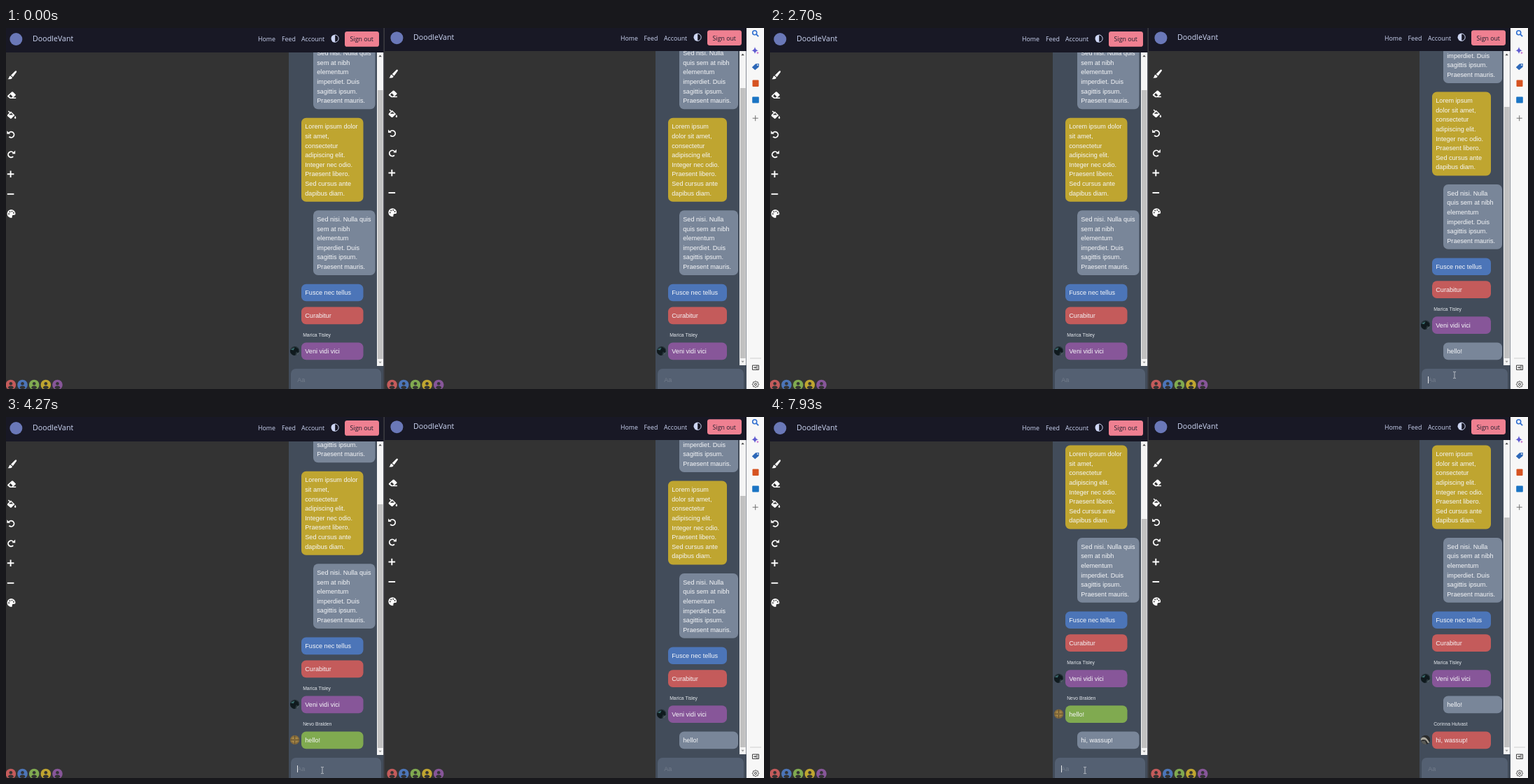
Write an HTML page with a canvas that moves like this. It is 1083 by 517 pixels and loops after 8 s.

```html
<!DOCTYPE html>
<html lang="en">
<head>
<meta charset="utf-8">
<title>Shared canvas chat</title>
<style>
  html, body { margin: 0; width: 100%; height: 100%; overflow: hidden; background: #333; }
  canvas { display: block; width: 100vw; height: 100vh; }
</style>
</head>
<body>
<canvas id="stage" width="1083" height="517"></canvas>
<script>
const ctx = document.getElementById('stage').getContext('2d');
const LOOP = 8000, BLINK = 530, LINE = 13.62;
const CHAT = '9.1px "Liberation Sans", Arial, sans-serif';
const NAME = '6.8px "Liberation Sans", Arial, sans-serif';
const NAV = '8.8px "Open Sans", sans-serif';
const BRAND = '10.7px "Open Sans", sans-serif';
const C = {
  bar: '#181825', page: '#333333', panel: '#424c5a', input: '#546072', own: '#798699',
  yellow: '#bfa530', blue: '#4c75b8', red: '#c45b5b', purple: '#875699', green: '#80aa50',
  nav: '#cdd6f4', white: '#f6f7f9'
};

function box(x, y, w, h, color, r = 0) {
  ctx.fillStyle = color;
  ctx.beginPath();
  ctx.roundRect(x, y, w, h, r);
  ctx.fill();
}
function disc(x, y, r, color) {
  ctx.fillStyle = color;
  ctx.beginPath();
  ctx.arc(x, y, r, 0, Math.PI * 2);
  ctx.fill();
}
function text(s, x, y, font, color) {
  ctx.font = font;
  ctx.fillStyle = color;
  ctx.fillText(s, x, y);
}
function fill(d, color) {
  ctx.fillStyle = color;
  ctx.fill(new Path2D(d), 'evenodd');
}
function stroke(d, color, w) {
  ctx.strokeStyle = color;
  ctx.lineWidth = w;
  ctx.stroke(new Path2D(d));
}
function at(x, y, draw) {
  ctx.save();
  ctx.translate(x, y);
  draw();
  ctx.restore();
}

// Toolbar icons, drawn around their centre
function turn() {
  ctx.strokeStyle = '#fff';
  ctx.lineWidth = 1.8;
  ctx.beginPath();
  ctx.arc(0.4, 0.2, 4.1, -2.5, 2.4);
  ctx.stroke();
  fill('M-5.6 -5.4V-.8H-1Z', '#fff');
}
const tools = [
  [9, 67.3, () => fill('M6.2 -5.2Q5.6 -6.6 4 -5.6L-2 .4L.8 3L6 -4ZM-2.8 1.2L0 3.7Q-.5 6 -3 6H-6.4Q-4.6 4.6 -4.5 3Q-4.3 1.4 -2.8 1.2Z', '#fff')],
  [8.2, 96, () => fill('M-6 1L0 -4.5Q1 -5 2 -4.3L5.5 -.8Q6 0 5.3 .8L2 3.5H6V5H-2.5L-6 2.2ZM-3.8 1.5L-1.5 3.5H0L1.3 2.2L-1.8 -1Z', '#fff')],
  [8, 124.5, () => {
    fill('M-6 0L-1 -5L4.5 .5L-.5 5.2Q-1.2 5.7 -2 5L-6 1.5ZM-3.8 0H2.2L-1 -3.2Z', '#fff');
    stroke('M-4.6 -5.6L-1 -2', '#fff', 1.4);
    fill('M5.2 1.3Q7.6 5.2 5.2 5.4Q2.8 5.2 5.2 1.3Z', '#fff');
  }],
  [7, 152.6, turn],
  [7.6, 181, () => { ctx.scale(-1, 1); turn(); }],
  [6.6, 209.3, () => stroke('M-4.8 0H4.8M0 -4.8V4.8', '#fff', 1.9)],
  [6.6, 237.8, () => stroke('M-4.8 0H4.8', '#fff', 1.9)],
  [7.5, 266, () => {
    fill('M0 -6A6 6 0 1 0 .3 6Q1.8 5.6 1.2 4Q.8 2 3 1.8H4.5Q6 1.6 6 0A6 6 0 0 0 0 -6Z', '#fff');
    [[-3.4, .2], [-2, -2.8], [1, -3.4], [3.4, -1.2]].forEach(([x, y]) => disc(x, y, 0.95, C.page));
  }]
];

// Small round portraits
function portrait(base, parts) {
  ctx.beginPath();
  ctx.arc(0, 0, 6.7, 0, Math.PI * 2);
  ctx.clip();
  fill('M-7 -7H7V7H-7Z', base);
  parts.forEach(([d, color]) => fill(d, color));
}
const avatars = {
  night: () => portrait('#27343a', [
    ['M-7 -1L0 -6L5 -3L6 3L2 1L0 7H-7Z', '#101a1e'],
    ['M-6 -2L0 -5L-2 -1Z', '#3c6f70'], ['M3 4L7 1V7H2Z', '#55636a']]),
  shell: () => portrait('#846a3b', [
    ['M-4 -4H4L5 2L0 5L-5 2Z', '#a08245'], ['M-.5 -6H.5V6H-.5ZM-6 -.5H6V.5H-6Z', '#5b4a2d']]),
  bird: () => portrait('#2b2c2c', [
    ['M-7 -2Q0 -8 6 5L3 4Q0 -3 -7 1Z', '#aaa79c'], ['M-7 2L-1 1L2 7H-7Z', '#595a57']])
};

const latin = 'consectetur|adipiscing elit.|Integer nec odio.|Praesent libero.|Sed cursus ante|dapibus diam.';
const wrap = s => s.split('|');
function history(lorem, sed) {
  const mine = { own: true, lines: wrap(sed + '|elementum|imperdiet. Duis|sagittis ipsum.|Praesent mauris.') };
  return [
    mine,
    { color: C.yellow, lines: wrap(lorem + '|' + latin) },
    mine,
    { color: C.blue, lines: ['Fusce nec tellus'] },
    { color: C.red, lines: ['Curabitur'] },
    { color: C.purple, lines: ['Veni vidi vici'], name: 'Marica Tisley', avatar: 'night' }
  ];
}

const left = {
  x: 0, top: 35, end: 540, shift: 0, brandX: 38, nav: [360, 394, 422, 470, 484],
  panel: 404, bar: 530, other: 422, mine: 439, bubble: 88.5, trackEnd: 484, inputW: 129,
  thumbs: [89, 125, 146], click: 4200, blur: LOOP, draft: 'hi, wassup!', sent: 6890,
  keys: [4940, 5140, 5380, 5490, 5600, 5700, 5810, 5990, 6095, 6200, 6420],
  msgs: [...history('Lorem ipsum dolor|sit amet,', 'Sed nisi. Nulla quis|sem at nibh'),
    { from: 2760, color: C.green, lines: ['hello!'], name: 'Nevo Bralden', avatar: 'shell', seen: 2990 },
    { from: 6890, own: true, lines: ['hi, wassup!'] }]
};
const right = {
  x: 541, top: 33, end: 1058, shift: -1.8, brandX: 582, nav: [878, 911.5, 940, 988, 1002],
  panel: 928, bar: 1048, other: 946, mine: 962, bubble: 84, trackEnd: 483, inputW: 123,
  thumbs: [86, 113, 144], click: 620, blur: 4200, draft: 'hello!', sent: 2700,
  keys: [1410, 1520, 1630, 1740, 1900, 2360],
  msgs: [...history('Lorem ipsum|dolor sit amet,', 'Sed nisi. Nulla|quis sem at nibh'),
    { from: 2700, own: true, lines: ['hello!'] },
    { from: 6950, color: C.red, lines: ['hi, wassup!'], name: 'Corinna Hulvast', avatar: 'bird', seen: 7150 }]
};

function drawMessages(p, list, t) {
  let bottom = 475.2;
  for (let i = list.length - 1; i >= 0; i--) {
    const m = list[i], h = m.lines.length * LINE + 11, y = bottom - h;
    const x = m.own ? p.mine : p.other;
    box(x, y, p.bubble, h, m.own ? C.own : m.color, 6.8);
    m.lines.forEach((s, k) => text(s, x + 5.3, y + 15.6 + k * LINE, CHAT, C.white));
    let gap = i && m.own === list[i - 1].own ? 8.3 : 12.6;
    if (m.name) {
      gap = 26.4;
      text(m.name, x + 2.2, y - 8.4, NAME, '#e3e7ec');
      if (t >= (m.seen || 0)) at(p.panel + 8.6, y + 11.8, avatars[m.avatar]);
    }
    bottom = y - gap;
  }
}

function drawInput(p, t) {
  box(p.panel, p.trackEnd, p.end - p.panel, 40, C.panel);
  box(p.panel + 3, 488, p.inputW, 50, C.input, 7);
  const x = p.panel + 12.2;
  const typed = t < p.sent ? p.draft.slice(0, p.keys.filter(k => k <= t).length) : '';
  text(typed || 'Aa', x, 506.8, CHAT, typed ? C.white : '#727c8b');
  if (t < p.click || t >= p.blur) return;
  const last = Math.max(p.click, ...p.keys.filter(k => k <= t));
  if (Math.floor((t - last) / BLINK) % 2) return;
  ctx.font = CHAT;
  box(x + (typed ? ctx.measureText(typed).width : -0.2), 499, 0.9, 10, '#f4f4f4');
}

function drawScrollbar(p, thumb) {
  const x = p.bar, mid = x + 4.6, end = p.trackEnd;
  box(x, p.top, 9.4, end - p.top, '#f4f4f4');
  box(x + 1, thumb, 7.6, end - 10 - thumb, '#c1c1c1');
  at(mid, p.top + 5, () => fill('M-2.2 1.3L0 -1.3L2.2 1.3Z', '#404040'));
  at(mid, end - 5, () => fill('M-2.2 -1.3L0 1.3L2.2 -1.3Z', '#9a9a9a'));
}

function drawHeader(p) {
  const [home, feed, account, half, button] = p.nav, y = 16 + p.shift;
  box(p.x, 0, p.end - p.x, p.top, C.bar);
  disc(p.brandX - 23.6, y, 9, '#6a78b8');
  text('DoodleVant', p.brandX, y + 3, BRAND, C.nav);
  text('Home', home, y + 3.4, NAV, C.nav);
  text('Feed', feed, y + 3.4, NAV, C.nav);
  text('Account', account, y + 3.4, NAV, C.nav);
  at(half, y - 0.9, () => {
    stroke('M0 -5.2A5.2 5.2 0 0 1 0 5.2', C.nav, 1);
    fill('M.2 -5.7A5.7 5.7 0 0 0 .2 5.7Z', C.nav);
  });
  box(button, y - 11, 49, 21.8, '#ef8091', 3.4);
  text('Sign out', button + 7.6, y + 3.4, NAV, '#1e1e2e');
}

function drawPane(p, t) {
  const list = p.msgs.filter(m => t >= (m.from || 0));
  box(p.x, 0, p.end - p.x, 517, C.page);
  const dx = p === right ? 544.7 : 0;
  tools.forEach(([x, y, draw]) => at(x + dx, y + p.shift, draw));
  [C.red, C.blue, C.green, C.yellow, C.purple].forEach((color, i) => at(6.9 + dx + i * 16.65, 511, () => {
    disc(0, 0, 7.3, color);
    disc(0, -1.7, 2.3, C.page);
    fill('M-4.1 4.6Q-3.6 1.7 -1.2 1.5H1.2Q3.6 1.7 4.1 4.6Q0 7.6 -4.1 4.6Z', C.page);
  }));
  box(p.panel, p.top, p.end - p.panel, 517, C.panel);
  drawMessages(p, list, t);
  drawScrollbar(p, p.thumbs[list.length - 6]);
  drawInput(p, t);
  drawHeader(p);
}

function drawSidebar() {
  const dark = '#3c3c3c';
  box(1058, 0, 25, 517, '#f7f7f7');
  at(1070.5, 7.5, () => {
    ctx.strokeStyle = '#2f6fd0';
    ctx.lineWidth = 1.6;
    ctx.beginPath();
    ctx.arc(-0.8, -0.8, 3, 0, Math.PI * 2);
    ctx.stroke();
    stroke('M1.4 1.4L4.6 4.6', '#2f6fd0', 1.8);
  });
  at(1070.5, 32, () => {
    fill('M-.5 -5Q.3 -.3 4.5 .2Q.3 .8 -.5 5Q-1.3 .8 -5.3 .2Q-1.3 -.3 -.5 -5Z', '#5f5bd0');
    fill('M3.4 1.8Q3.7 3.5 5.4 3.8Q3.7 4.1 3.4 5.6Q3.1 4.1 1.6 3.8Q3.1 3.5 3.4 1.8Z', '#c263c8');
  });
  at(1071, 55.7, () => {
    fill('M0 -4.4L4.8 -4.8L4.6 0L-.8 4.6L-5.2 .6Z', '#2d68b8');
    disc(2.8, -2.7, 0.9, '#f7f7f7');
  });
  box(1066.5, 74.5, 9, 9.6, '#d65321', 1);
  box(1066.2, 98.6, 9.6, 9, '#1a74c4', 1);
  at(1070.7, 129.2, () => stroke('M-4 0H4M0 -4V4', '#666', 0.9));
  box(1063, 472.5, 16, 1, '#cfcfcf');
  at(1071, 486.3, () => {
    stroke('M-4.5 -3.2H4.5V3.2H-4.5ZM2 -3.2V3.2M-3 0H.6M-.8 -1.4L.6 0L-.8 1.4', dark, 1);
  });
  at(1071, 510.3, () => {
    ctx.strokeStyle = dark;
    ctx.lineWidth = 1;
    ctx.beginPath();
    for (let i = 0; i <= 64; i++) {
      const a = i / 64 * Math.PI * 2, r = 4.1 + 0.6 * Math.cos(a * 8);
      ctx.lineTo(r * Math.cos(a), r * Math.sin(a));
    }
    ctx.moveTo(1.5, 0);
    ctx.arc(0, 0, 1.5, 0, Math.PI * 2);
    ctx.stroke();
  });
}

// Pointer stops: time, x, y
const path = [
  [290, 545, 517], [370, 640, 511], [480, 830, 506], [580, 968, 500], [640, 983, 497], [760, 978, 497],
  [3380, 978, 497], [3520, 925, 507], [3780, 720, 512], [4020, 500, 511], [4120, 446, 509], [4270, 452, 506],
  [7929, 452, 506], [7930, 450, 506]
];
function pointer(t) {
  const i = path.findIndex(k => k[0] > t);
  if (i < 0) return path[path.length - 1].slice(1);
  const [t0, x0, y0] = path[i - 1], [t1, x1, y1] = path[i], u = (t - t0) / (t1 - t0);
  return [x0 + (x1 - x0) * u, y0 + (y1 - y0) * u];
}
function drawPointer(t) {
  if (t < path[0][0]) return;
  const [x, y] = pointer(t);
  const typing = y > 488 && [left, right].some(p => x > p.panel + 3 && x < p.panel + 3 + p.inputW);
  at(x, y, () => {
    if (typing) return stroke('M-2 -4.6H-.5L0 -4.2L.5 -4.6H2M0 -4.2V4.2M-2 4.6H-.5L0 4.2L.5 4.6H2', '#c3c8cf', 0.9);
    const arrow = 'M0 0V9.5L2.3 7.4L3.8 10.8L5.2 10.2L3.8 6.9H6.8Z';
    fill(arrow, '#fff');
    stroke(arrow, '#222', 0.6);
  });
}

function frame(now) {
  const t = now % LOOP;
  drawPane(left, t);
  drawPane(right, t);
  box(539.4, 0, 1.6, 517, '#3b3b40');
  drawSidebar();
  drawPointer(t);
  requestAnimationFrame(() => frame(performance.now() - start));
}
const start = performance.now();
frame(0);
</script>
</body>
</html>
```
